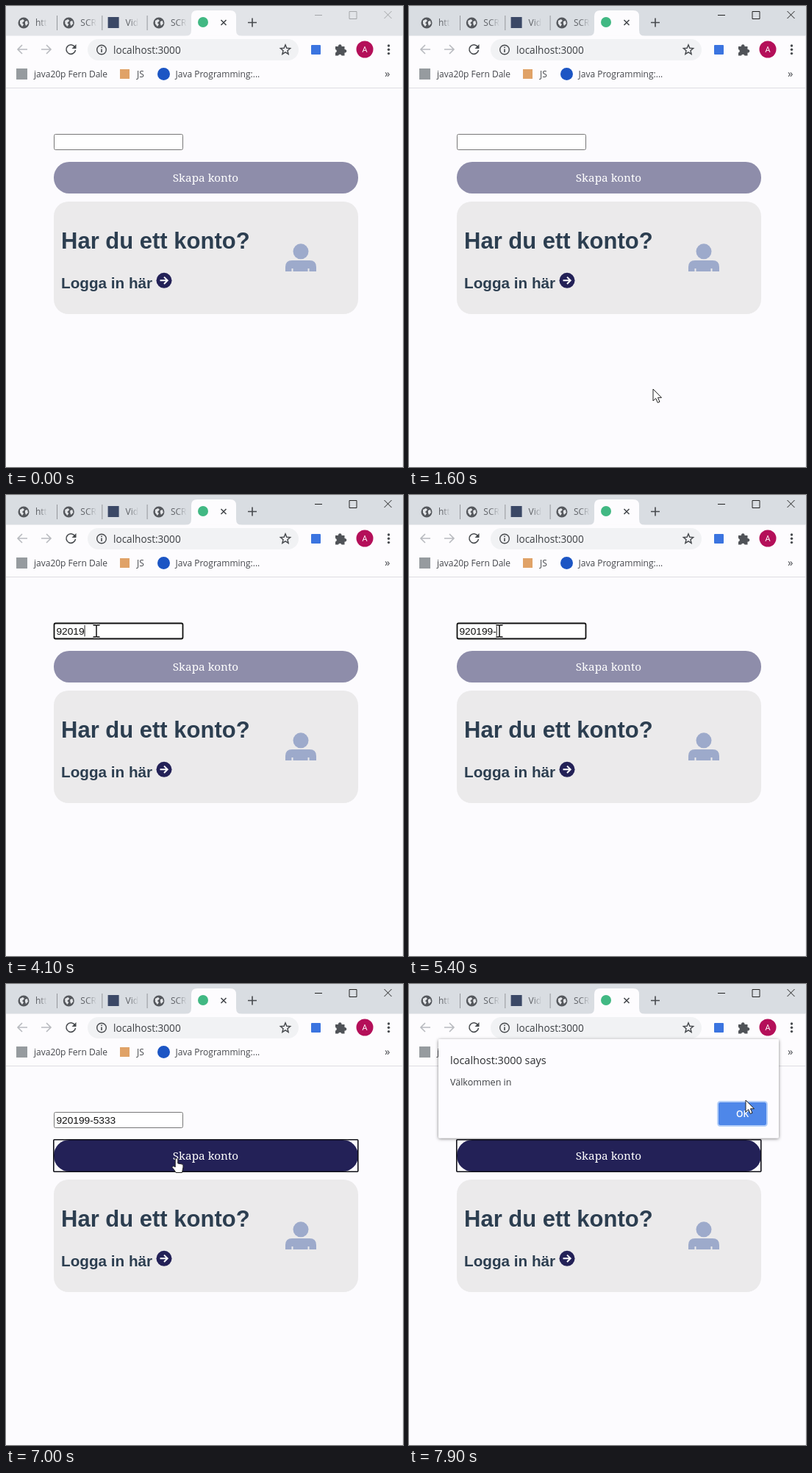
An HTML page that plays this animation: 540 by 627 pixels, repeating every 8000 ms.

```html
<!DOCTYPE html>
<html lang="sv">
<head>
<meta charset="utf-8">
<style>
  html, body { margin: 0; width: 100%; height: 100%; overflow: hidden; background: #fcfbfe }
  svg { display: block; width: 540px; height: 627px }
  text { font-family: "Open Sans", sans-serif; font-size: 12px; fill: #45474c; white-space: pre }
  .line { fill: none; stroke: #46494d; stroke-width: 1.6 }
  .page { font-family: "Liberation Sans", Arial, sans-serif; font-weight: bold; fill: #2c3e50 }
</style>
</head>
<body>
<svg viewBox="0 0 540 627">
  <defs>
    <linearGradient id="fade">
      <stop offset=".35" stop-color="#5c5f64"/>
      <stop offset="1" stop-color="#5c5f64" stop-opacity="0"/>
    </linearGradient>
    <filter id="shadow" x="-10%" y="-10%" width="120%" height="130%">
      <feDropShadow dx="0" dy="1" stdDeviation="2" flood-opacity=".5"/>
    </filter>
    <g id="globe">
      <circle r="7.5" fill="#55585d"/>
      <path d="M-5 -3 L-1 -5 L1 -3 L-2 0 L0 2 L-2 5 L-5 1 Z M2 -2 L5 -3 L6 1 L3 4 L2 1 Z" fill="#e4e6e9"/>
    </g>
  </defs>

  <!-- tab strip -->
  <rect id="strip" width="540" height="41"/>
  <g id="tabs"></g>
  <path d="M244 41 Q252 41 252 33 V14 Q252 6 260 6 H305 Q313 6 313 14 V33 Q313 41 321 41 Z" fill="#fdfcfe"/>
  <circle cx="268" cy="22" r="7" fill="#41b883"/>
  <path class="line" d="M292.500 19 l7 7 m0 -7 l-7 7 M329 22.500 h12 m-6 -6 v12"/>
  <path id="controls" d="M420 12.500 h10 M467 7.500 h10 v10 h-10 Z M514.500 7 l10 10 m0 -10 l-10 10" fill="none"/>

  <!-- toolbar -->
  <rect y="40.500" width="540" height="71" fill="#fdfcfe"/>
  <path class="line" d="M29 59 H16 m6 -6 l-6 6 l6 6 M48 59 h13 m-6 -6 l6 6 l-6 6" style="stroke:#b9bbc0"/>
  <path class="line" d="M93.500 55.500 A6.300 6.300 0 1 0 94.500 60"/>
  <path d="M95.500 52 v6 h-6 Z" fill="#46494d"/>
  <rect x="111" y="45" width="287" height="29" rx="14.500" fill="#f1f2f4"/>
  <circle class="line" cx="130" cy="59.500" r="6.300" style="stroke-width:1.400"/>
  <path class="line" d="M130 58.500 v4.500 m0 -7.500 v1.500"/>
  <text x="146" y="64.500" style="font-size:13.600px;fill:#3c3f43">localhost:3000</text>
  <path id="star" class="line" style="stroke-width:1.400"/>
  <rect x="415" y="53" width="13" height="13" rx="1" fill="#3b74e0"/>
  <path d="M448 55 h4 a2.300 2.300 0 1 1 4.500 0 h4 v4 a2.300 2.300 0 1 1 0 4.500 v4 h-4 a2.300 2.300 0 0 0 -4.500 0 h-4 v-4 a2.300 2.300 0 0 0 0 -4.500 Z" fill="#505358"/>
  <circle cx="488" cy="59" r="11.500" fill="#b40f59"/>
  <text x="488" y="63" text-anchor="middle" style="font-size:11px;fill:#fff">A</text>
  <g fill="#46494d"><circle cx="520.500" cy="54" r="1.700"/><circle cx="520.500" cy="59.300" r="1.700"/><circle cx="520.500" cy="64.600" r="1.700"/></g>

  <!-- bookmarks -->
  <rect x="14" y="85" width="15" height="15" fill="#969b9f"/>
  <text x="38" y="96.500">java20p Fern Dale</text>
  <rect x="155" y="86" width="13" height="13" fill="#e0a267"/>
  <text x="178" y="96.500">JS</text>
  <circle cx="214.500" cy="92.500" r="8.500" fill="#1c55c4"/>
  <text x="230.500" y="96.500">Java Programming:...</text>
  <text x="515" y="96.500" style="font-size:15px">»</text>
  <path d="M0 111.500 H540" stroke="#dedee2"/>
  <path d="M539.500 41 V627" stroke="#ececf0"/>

  <!-- page -->
  <rect id="field" x="65.500" y="174.500" width="175" height="21" rx="2" fill="#fff"/>
  <text id="typed" x="68.500" y="189.500" style="font:13.700px 'Liberation Sans',Arial,sans-serif;fill:#111"></text>
  <rect id="caret" y="177" width="1" height="15.500" fill="#222"/>
  <rect id="button" x="65" y="212" width="414" height="43" rx="21"/>
  <text x="271.500" y="239" text-anchor="middle" style="font:15.300px 'Noto Serif',serif;fill:#fff">Skapa konto</text>
  <rect id="ring" x="64.800" y="211.800" width="414" height="43.500" rx="1" fill="none" stroke="#101018" stroke-width="1.600"/>
  <rect x="65" y="266" width="414" height="153" rx="20" fill="#ebeaeb"/>
  <text class="page" x="75" y="330" style="font-size:31px">Har du ett konto?</text>
  <text class="page" x="75" y="383.500" style="font-size:20.700px">Logga in här</text>
  <circle cx="215" cy="373.300" r="10.500" fill="#232157"/>
  <path d="M209.500 373.300 h10 m-4.500 -4.700 l4.700 4.700 l-4.700 4.700" fill="none" stroke="#fff" stroke-width="2"/>
  <g fill="#9daacb">
    <circle cx="401" cy="333.800" r="10.500"/>
    <path d="M380 361 V355 Q380 346 389 346 H413 Q422 346 422 355 V361 H412.500 V357 H410.500 V361 H390.500 V357 H388.500 V361 Z"/>
  </g>

  <g id="dialog">
    <rect x="40" y="75" width="463" height="134.500" rx="2" fill="#fdfcff" filter="url(#shadow)"/>
    <text x="56" y="109" style="font-size:14.500px;fill:#2c2e31">localhost:3000 says</text>
    <text x="56" y="138" style="font-size:12.550px;fill:#3c3e42">Välkommen in</text>
    <rect x="420" y="160" width="67" height="33" rx="3.500" fill="#4e87e9" stroke="#b5cff8" stroke-width="2"/>
    <text x="453.500" y="181" text-anchor="middle" style="font-weight:600;fill:#fff">OK</text>
  </g>

  <g id="pointer">
    <path id="arrow" d="M0 0 V16 L3.700 12.700 L6.300 18.500 L9 17.300 L6.500 11.700 H11.500 Z" fill="#fff" stroke="#222" stroke-linejoin="round"/>
    <g id="beam" fill="none">
      <path d="M-4 -8 H4 M0 -8 V8 M-4 8 H4" stroke="#fff" stroke-width="3"/>
      <path d="M-4.500 -8 H-1 L0 -7 L1 -8 H4.500 M0 -7 V7 M-4.500 8 H-1 L0 7 L1 8 H4.500" stroke="#111" stroke-width="1.500"/>
    </g>
    <path id="hand" d="M-1.800 1 Q0 -1.500 1.800 1 V7 L7.500 8 Q9.500 9 9 12 L7.500 19.500 H-1 Q-3 15.500 -6 12.500 Q-5.500 9.500 -1.800 12 Z" fill="#fff" stroke="#222" stroke-linejoin="round"/>
  </g>
</svg>
<script>
const $ = id => document.getElementById(id);
const set = (id, attrs) => { for (const k in attrs) $(id).setAttribute(k, attrs[k]); };
const show = (id, on) => $(id).style.display = on ? '' : 'none';

$('tabs').innerHTML = ['htt', 'SCR', 'Vid', 'SCR'].map((label, i) => {
  const x = 24 + i * 61.3;
  const icon = i === 2
    ? `<rect x="${x - 8}" y="15" width="15" height="15" fill="#3b4866"/>`
    : `<use href="#globe" x="${x}" y="23"/>`;
  const divider = i < 3 ? `<path d="M${x + 45.5} 13 v20" stroke="#94979c"/>` : '';
  return `${icon}<text x="${x + 16}" y="27" style="fill:url(#fade)">${label}</text>${divider}`;
}).join('');

$('star').setAttribute('d', 'M' + Array.from({ length: 10 }, (_, i) => {
  const a = i * Math.PI / 5, r = i % 2 ? 3.1 : 7;
  return `${380 + r * Math.sin(a)} ${59.8 - r * Math.cos(a)}`;
}).join('L') + 'Z');

const LOOP = 8000, ACTIVE = 1000, FOCUS = 2200, CLICK = 7000;
const ENTRY = '920199-5333';
const KEYS = [3200, 3300, 3400, 3600, 3900, 4200, 5100, 5700, 5800, 6100, 6200];
// time, x, y
const PATH = [
  [1300, 420, 627], [1600, 332, 521], [1700, 262, 365], [2000, 135, 200], [2200, 123, 185],
  [6500, 123, 185], [6900, 232, 237], [7400, 232, 237], [7800, 452, 162], [7900, 458, 158]
];

function pointerAt(t) {
  const i = PATH.findIndex(p => p[0] > t);
  if (i < 0) return PATH.at(-1).slice(1);
  if (!i) return null;
  const [a, b] = [PATH[i - 1], PATH[i]], k = (t - a[0]) / (b[0] - a[0]);
  return [1, 2].map(n => a[n] + (b[n] - a[n]) * k);
}

function draw(t) {
  const active = t >= ACTIVE, focused = t >= FOCUS && t < CLICK;
  set('strip', { fill: active ? '#d9dde2' : '#e2e4e8' });
  set('controls', { stroke: active ? '#222' : '#a3a5a8' });
  set('field', { stroke: focused ? '#101010' : '#777', 'stroke-width': focused ? 1.8 : 1 });

  const count = KEYS.filter(k => k <= t).length;
  $('typed').textContent = ENTRY.slice(0, count);
  const since = t - (count ? KEYS[count - 1] : FOCUS);
  show('caret', focused && since % 1000 < 500);
  set('caret', { x: 68.5 + (count ? $('typed').getComputedTextLength() : 0) });

  const ready = count === ENTRY.length;
  set('button', { fill: ready ? '#232157' : '#8e8daa' });
  show('ring', t >= CLICK);
  show('dialog', t >= CLICK + 100);

  const pos = pointerAt(t);
  show('pointer', pos);
  if (!pos) return;
  const [x, y] = pos;
  const inField = t < CLICK && x > 65 && x < 241 && y > 174 && y < 197;
  const onButton = ready && t <= 7400 && y > 211;
  set('pointer', { transform: `translate(${x} ${y})` });
  show('beam', inField);
  show('hand', onButton);
  show('arrow', !inField && !onButton);
}

const start = performance.now();
function tick() {
  // the screen refreshes ten times a second
  draw(Math.floor((performance.now() - start) % LOOP / 100) * 100);
  requestAnimationFrame(tick);
}
tick();
</script>
</body>
</html>
```
